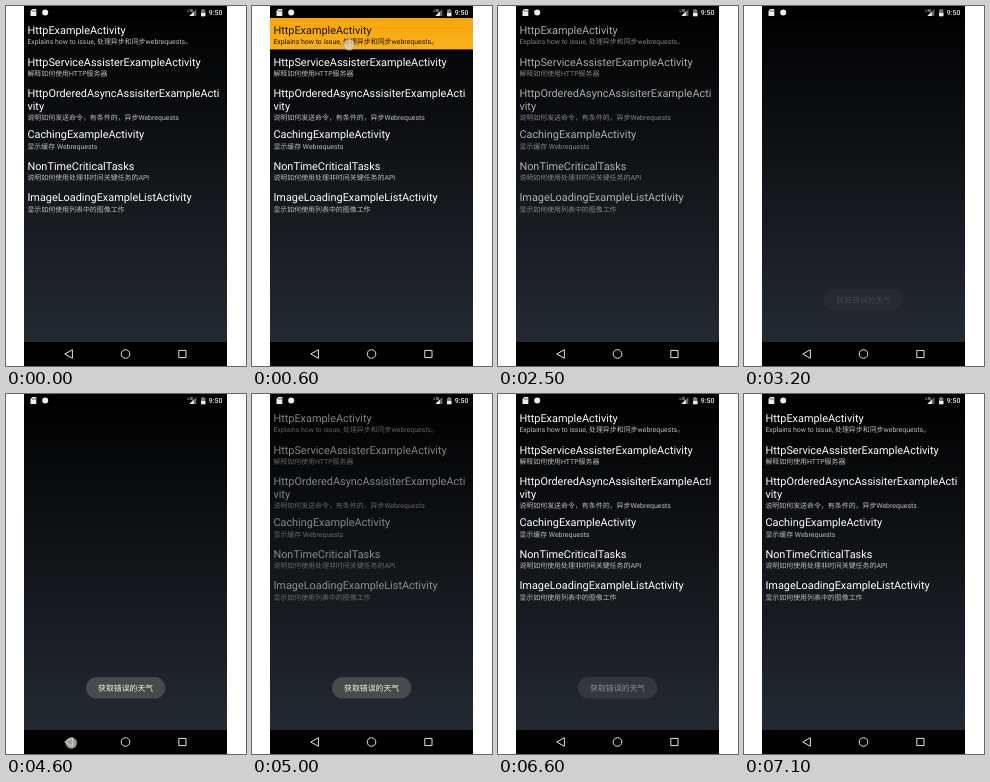
Recreate the animation shown at these times as an HTML page. Size 240 px wide and 360 px high, loop 8000 ms.

```html
<!DOCTYPE html>
<html lang="zh-CN">
<head>
<meta charset="utf-8">
<title>Example list</title>
<style>
html, body { margin: 0; width: 100%; height: 100%; overflow: hidden; background: #fff; }
svg { display: block; width: 240px; height: 360px; }
text { font-family: Roboto, "Noto Sans CJK SC", "Noto Sans CJK", sans-serif; text-rendering: geometricPrecision; }
.title { font-size: 10.9px; fill: #fff; }
.sub { font-size: 6.94px; fill: #bebebe; }
#press text { fill: #1c1200; }
.nav { fill: none; stroke: #e4e4e4; stroke-linejoin: round; }
</style>
</head>
<body>
<svg viewBox="0 0 240 360">
  <defs>
    <linearGradient id="bg" x1="0" y1="0" x2="0" y2="1">
      <stop stop-color="#000"/><stop offset="1" stop-color="#272c35"/>
    </linearGradient>
    <linearGradient id="amber" x1="0" y1="0" x2="0" y2="1">
      <stop stop-color="#f8a60a"/><stop offset="1" stop-color="#fbb01c"/>
    </linearGradient>
  </defs>

  <rect x="18" width="203" height="360" fill="url(#bg)"/>
  <rect x="18" width="203" height="12" fill="#000"/>
  <rect x="18" y="336" width="203" height="24" fill="#000"/>
  <g id="list"></g>
  <g id="press">
    <rect x="18" y="12" width="203" height="31.4" fill="url(#amber)"/>
  </g>

  <g id="status" fill="#eee">
    <path d="M26.4 3h3.9v7h-5.8v-5z"/>
    <path d="M26.7 4.2v1.6M28 4.2v1.6M29.2 4.2v1.6" stroke="#000" stroke-width=".5"/>
    <circle cx="39.2" cy="6.4" r="3"/>
    <text x="181.6" y="5.8" font-size="3.6" font-weight="500">LTE</text>
    <path d="M190.4 3v7h-7z" fill="#666"/>
    <path d="M187.8 5.6v4.4h-4.4z"/>
    <path d="M196.3 3h1.8v.8h1.3v6.4h-4.4v-6.4h1.3z" fill="#777"/>
    <path d="M195 7h4.4v3.2h-4.4z"/>
    <text x="202.8" y="9.2" font-size="6.94" font-weight="500">9:50</text>
  </g>

  <g class="nav">
    <path d="M58.8 348l7.6-4.3v8.6z"/>
    <circle cx="119.5" cy="348" r="4.3"/>
    <rect x="172.8" y="344.4" width="7.2" height="7.2"/>
  </g>

  <g id="toast">
    <rect x="80" y="283" width="79.3" height="21.6" rx="10.8" fill="#484a4b"/>
    <text x="119.6" y="296.6" font-size="7.88" text-anchor="middle" fill="#f2f2f2">获取错误的天气</text>
  </g>

  <g fill="#d6d3cc" fill-opacity=".75" stroke="#807c74" stroke-opacity=".5" stroke-width=".7">
    <circle id="tap" cx="97.3" cy="38.8" r="5.6"/>
    <circle id="backTap" cx="65.3" cy="349" r="5.6"/>
  </g>
</svg>
<script>
const LOOP = 8000, TICK = 100;
const ROW = 31.6, WRAP = 12.7, SUB = 10.4;
const $ = id => document.getElementById(id);

// Title lines, then the description
const rows = [
  ['HttpExampleActivity', 'Explains how to issue, 处理异步和同步webrequests。'],
  ['HttpServiceAssisterExampleActivity', '解释如何使用HTTP服务器'],
  ['HttpOrderedAsyncAssisiterExampleActi', 'vity', '说明如何发送命令，有条件的，异步Webrequests'],
  ['CachingExampleActivity', '显示缓存 Webrequests'],
  ['NonTimeCriticalTasks', '说明如何使用处理非时间关键任务的API'],
  ['ImageLoadingExampleListActivity', '显示如何使用列表中的图像工作']
];

function addText(parent, cls, y, label) {
  const t = document.createElementNS('http://www.w3.org/2000/svg', 'text');
  t.setAttribute('class', cls);
  t.setAttribute('x', 21.4);
  t.setAttribute('y', y);
  t.textContent = label;
  parent.append(t);
}

// Returns the baseline of the next row; wrapped rows sit a little tighter
function addRow(parent, row, y) {
  const titles = row.slice(0, -1);
  const last = y + (titles.length - 1) * WRAP;
  titles.forEach((label, i) => addText(parent, 'title', y + i * WRAP, label));
  addText(parent, 'sub', last + SUB, row.at(-1));
  return last + ROW - (titles.length - 1) * 3.3;
}

const top0 = 28;
rows.reduce((y, row) => addRow($('list'), row, y), top0);
addRow($('press'), rows[0], top0);

// Each fade flips visibility from a start time over a number of ticks
function fades(id, visible, ...turns) {
  let opacity = visible;
  const frames = [{ offset: 0, opacity }];
  for (const [start, ticks] of turns) {
    frames.push({ offset: start / LOOP, opacity, easing: `steps(${ticks}, jump-start)` });
    opacity = 1 - opacity;
    frames.push({ offset: (start + ticks * TICK) / LOOP, opacity });
  }
  frames.push({ offset: 1, opacity });
  $(id).animate(frames, { duration: LOOP, iterations: Infinity });
}

fades('tap', 0, [500, 1], [800, 2]);
fades('press', 0, [600, 1], [900, 2]);
fades('list', 1, [2500, 3], [4900, 4]);
fades('toast', 0, [3200, 6], [6500, 4]);
fades('backTap', 0, [4600, 1], [4900, 2]);
</script>
</body>
</html>
```
